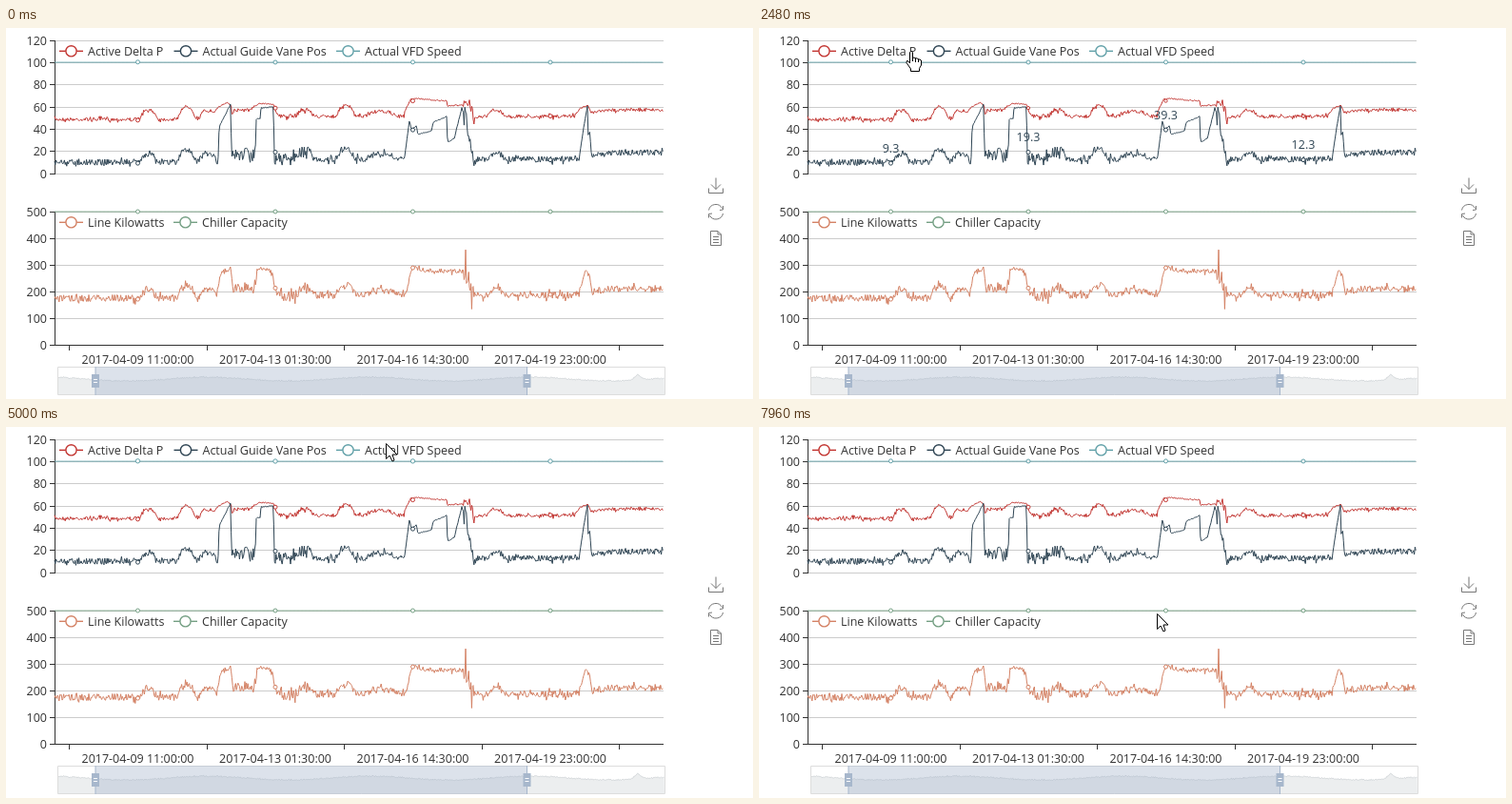
An HTML page with a canvas that plays this animation: 785 by 390 pixels, repeating every 8000 ms.

```html
<!DOCTYPE html>
<html lang="en">
<head>
<meta charset="utf-8">
<title>Chiller chart</title>
<style>
html, body { margin: 0; width: 100%; height: 100%; overflow: hidden; background: #fff; }
canvas { display: block; }
</style>
</head>
<body>
<canvas id="stage" width="785" height="390"></canvas>
<script>
const LOOP = 8000, STEP = 40, GROW = 400;
const ctx = document.getElementById('stage').getContext('2d');
const markX = [138.5, 283, 427.5, 572];
const topY = v => 153 - v * 7 / 6;
const lowY = v => 333 - v * 0.28;

let seed = 7;
const rnd = () => (seed = seed * 16807 % 2147483647) / 2147483647;
const jitter = n => n * (rnd() * 2 - 1) * (rnd() > 0.9 ? 1.5 : 0.8);

function sample(x1, x2, fn) {
  const path = new Path2D();
  for (let x = x1; x <= x2; x += 0.8) path.lineTo(x, fn(x));
  return path;
}

// Load swings shared by all curves: centre, half width, height
const swings = [[150, 8, 9], [190, 8, 13], [212, 8, 9], [250, 16, 10], [314, 8, 7],
  [357, 8, 11], [394, 14, 5], [515, 8, 6], [665, 55, 7]];
const swing = x => swings.reduce((sum, [c, w, h]) => sum + h * Math.exp(-(((x - c) / w) ** 4)), 0);

// Height on a run of [x, y, x, y, ...]
function along(run, x) {
  let i = 2;
  while (run[i] < x) i += 2;
  const f = (x - run[i - 2]) / (run[i] - run[i - 2]);
  return run[i - 1] + (run[i + 1] - run[i - 1]) * f;
}

function roughness(x, normal, rough) {
  if (x > 480 && x < 492) return rough * 2;
  return x > 238 && x < 262 || x > 283 && x < 320 ? rough : normal;
}

function curve(base, late, normal, rough, calm, runs) {
  return sample(51, 690.5, x => {
    const run = runs.find(r => x >= r[0] && x <= r[r.length - 2]);
    const y = run ? along(run, x) : (x < 283 ? base : late) - swing(x);
    return y + jitter(roughness(x, run ? calm : normal, rough));
  });
}

const deltaPath = curve(96, 93, 2.2, 3, 0.8, [
  [219, 89, 223, 83, 233, 78, 237, 82],
  [258, 86, 266, 79, 281, 80, 286, 91],
  [419, 88, 425, 75, 431, 74, 463, 77, 464, 82, 487, 80, 491, 91],
  [598, 91, 604, 84, 611, 81, 615, 89]]);
const vanePath = curve(141, 138, 4, 8, 0.6, [
  [223, 135, 224, 104, 236, 80, 237, 130],
  [262, 130, 263, 96, 267, 95, 268, 84, 281, 83, 282, 132],
  [419, 135, 424, 97, 426, 107, 431, 103, 433, 112, 447, 108, 449, 99, 463, 93,
    464, 120, 471, 116, 479, 84, 491, 125],
  [603, 132, 607, 105, 611, 82, 612, 120, 613, 104, 615, 130]]);
const powerPath = curve(284, 281, 4.5, 8, 2.8, [
  [222, 276, 226, 256, 236, 253, 238, 272],
  [262, 272, 264, 254, 272, 252, 280, 257, 283, 277],
  [420, 279, 427, 252, 440, 255, 486, 256, 488, 272],
  [603, 275, 609, 255, 613, 260, 616, 279]]);
const flat = y => sample(51, 690.5, () => y);

// hover: [start, end] times of each highlight
const series = [
  { name: 'Active Delta P', color: '#c23531', lx: 56, ly: 24, y: topY, path: deltaPath,
    marks: [48.1, 59, 65.5, 51.8], hover: [[1220, 2380]] },
  { name: 'Actual Guide Vane Pos', color: '#2f4554', lx: 176.5, ly: 24, y: topY, path: vanePath,
    marks: [9.3, 19.3, 39.3, 12.3], hover: [[1000, 1120], [2480, 2960], [3540, 4280]] },
  { name: 'Actual VFD Speed', color: '#61a0a8', lx: 347, ly: 24, y: topY, path: flat(36.1),
    marks: [100.5, 100.3, 100.4, 100.3], hover: [[800, 960], [4780, 4860], [5060, 6960]] },
  { name: 'Line Kilowatts', color: '#d48265', lx: 56, ly: 204, y: lowY, path: powerPath,
    marks: [171, 213, 289, 189], hover: [] },
  { name: 'Chiller Capacity', color: '#749f83', lx: 176, ly: 204, y: lowY, path: flat(193.1),
    marks: [500, 500, 500, 500], hover: [] }
];

const overview = sample(54, 692, x =>
  369 - 2 * Math.sin(x / 27) - 5 * Math.exp(-(((x - 664) / 5) ** 2)) + jitter(0.8));
const overviewArea = new Path2D(overview);
overviewArea.lineTo(692, 385);
overviewArea.lineTo(54, 385);

const arrow = new Path2D('M.5 .5V16.5L4 13 7 19 9 18 7 12H12Z');
const hand = new Path2D('M-1.5 13V1.5Q0-1 1.5 1.5V7L4.5 7.5 7.5 8.5 10.5 10V15L8.5 18.5V21.5H-.5V19L-5 12.5Q-5 9-3 11Z');
const handLines = new Path2D('M1.5 7v4m3-3v4m3-3v3');
const icons = new Path2D('M746 157.5v12m-5-5l5 5 5-5m-12.5 4v5h15v-5' +
  'M738.5 191.5a7.5 7.5 0 0 1 14-2m1 5.5a7.5 7.5 0 0 1-14 2m10.5-5.5l3.5-.5v-4M742 195l-3.5.5v4' +
  'M740.5 213.5h7.5l3.5 3.5v11.5h-11ZM748 213.5v3.5h3.5m-8.5 2.5h6m-6 3h6m-6 3h6');

// Pointer tip: time, x, y
const track = [
  [440, 430, 349], [600, 425, 200], [760, 415, 40], [960, 340, 22], [1240, 150, 21], [1400, 141, 20],
  [2240, 141, 20], [2880, 192, 30], [3000, 194, 36], [3520, 194, 36], [3640, 194, 24], [4240, 194, 24],
  [4560, 320, 172], [4720, 380, 60], [4880, 396, 6], [5000, 399, 17], [5080, 398, 21], [6840, 398, 21],
  [6880, 398, 27], [7400, 420, 92], [7640, 420, 92], [7720, 429, 140], [7800, 418, 195], [7960, 418, 196]
];

function elastic(k) {
  if (k <= 0) return 0;
  if (k >= 1) return 1;
  return 1 + 2 ** (-10 * k) * Math.sin((k - 0.1) * 5 * Math.PI);
}

const isHot = (s, t) => s.hover.some(([a, b]) => t >= a && t < b);

function growth(s, t) {
  const span = s.hover.filter(h => h[0] <= t).pop();
  if (!span) return 0;
  return t < span[1] ? elastic((t - span[0]) / GROW) : 1 - elastic((t - span[1]) / GROW);
}

function line(x1, y1, x2, y2, color) {
  ctx.strokeStyle = color;
  ctx.beginPath();
  ctx.moveTo(x1, y1);
  ctx.lineTo(x2, y2);
  ctx.stroke();
}

function text(str, x, y, color = '#333', align = 'center') {
  ctx.fillStyle = color;
  ctx.textAlign = align;
  ctx.fillText(str, x, y);
}

function ring(x, y, r, color) {
  ctx.fillStyle = '#fff';
  ctx.strokeStyle = color;
  ctx.beginPath();
  ctx.arc(x, y, Math.max(r, 0.5), 0, 7);
  ctx.fill();
  ctx.stroke();
}

function axis(scale, max, step) {
  for (let v = 0; v <= max; v += step) {
    const y = Math.floor(scale(v) + 0.01) + 0.5;
    line(51, y, 691, y, '#ccc');
    line(46, y, 51, y, '#333');
    text(v, 43, y + 4.5, '#333', 'right');
  }
  line(51.5, scale(max), 51.5, scale(0) + 1, '#333');
}

function axes() {
  axis(topY, 120, 20);
  axis(lowY, 500, 100);
  line(51, 333.5, 691, 333.5, '#333');
  for (let i = 0; i < 5; i++) {
    const x = Math.round(66 + i * 144.5) + 0.5;
    line(x, 333, x, 339, '#333');
  }
  ['2017-04-09 11:00:00', '2017-04-13 01:30:00', '2017-04-16 14:30:00', '2017-04-19 23:00:00']
    .forEach((d, i) => text(d, markX[i], 353));
}

function zoomBar() {
  ctx.fillStyle = 'rgba(47,69,84,.09)';
  ctx.fill(overviewArea);
  ctx.lineWidth = 0.5;
  ctx.strokeStyle = 'rgba(47,69,84,.3)';
  ctx.stroke(overview);
  ctx.lineWidth = 1;
  ctx.strokeStyle = '#ddd';
  ctx.strokeRect(54.5, 356.5, 638, 29);
  ctx.fillStyle = 'rgba(167,183,204,.4)';
  ctx.fillRect(94, 356, 453.5, 30);
  for (const x of [94, 547.5]) {
    line(x, 356, x, 386, '#a7b7cc');
    ctx.fillStyle = '#a7b7cc';
    ctx.fillRect(x - 4, 364, 8, 14);
    line(x - 2, 369.5, x + 2, 369.5, '#fff');
    line(x - 2, 372.5, x + 2, 372.5, '#fff');
  }
}

function plot(s, t) {
  ctx.strokeStyle = s.color;
  ctx.stroke(s.path);
  const r = 2 + 3 * growth(s, t);
  s.marks.forEach((v, i) => {
    const y = s.y(v);
    ring(markX[i], y, r, s.color);
    if (isHot(s, t)) text(v.toFixed(1), markX[i], Math.round(y - 11.5), s.color);
  });
}

function legend(s) {
  ctx.lineWidth = 1.4;
  line(s.lx, s.ly + 0.3, s.lx + 25, s.ly + 0.3, s.color);
  ring(s.lx + 12.5, s.ly + 0.3, 5.6, s.color);
  ctx.lineWidth = 1;
  text(s.name, s.lx + 30, s.ly + 5, '#333', 'left');
}

function pointer(t) {
  if (t < track[0][0]) return;
  const i = track.findLastIndex(k => k[0] <= t);
  const a = track[i], b = track[i + 1] || a;
  const f = a === b ? 0 : (t - a[0]) / (b[0] - a[0]);
  const hot = series.some(s => isHot(s, t));
  const shape = hot ? hand : arrow;
  ctx.save();
  ctx.translate(Math.round(a[1] + (b[1] - a[1]) * f), Math.round(a[2] + (b[2] - a[2]) * f));
  ctx.fillStyle = '#fff';
  ctx.strokeStyle = '#000';
  ctx.fill(shape);
  ctx.stroke(shape);
  if (hot) ctx.stroke(handLines);
  ctx.restore();
}

function draw(now) {
  const t = Math.floor(now % LOOP / STEP) * STEP;
  ctx.fillStyle = '#fff';
  ctx.fillRect(0, 0, 785, 390);
  ctx.font = '12.5px "Open Sans", "Noto Sans", sans-serif';
  ctx.lineWidth = 1;
  ctx.lineJoin = 'round';
  axes();
  zoomBar();
  series.forEach(s => plot(s, t));
  series.forEach(legend);
  ctx.strokeStyle = '#777';
  ctx.stroke(icons);
  pointer(t);
}

const begin = performance.now();
function tick() {
  draw(performance.now() - begin);
  requestAnimationFrame(tick);
}
tick();
</script>
</body>
</html>
```
